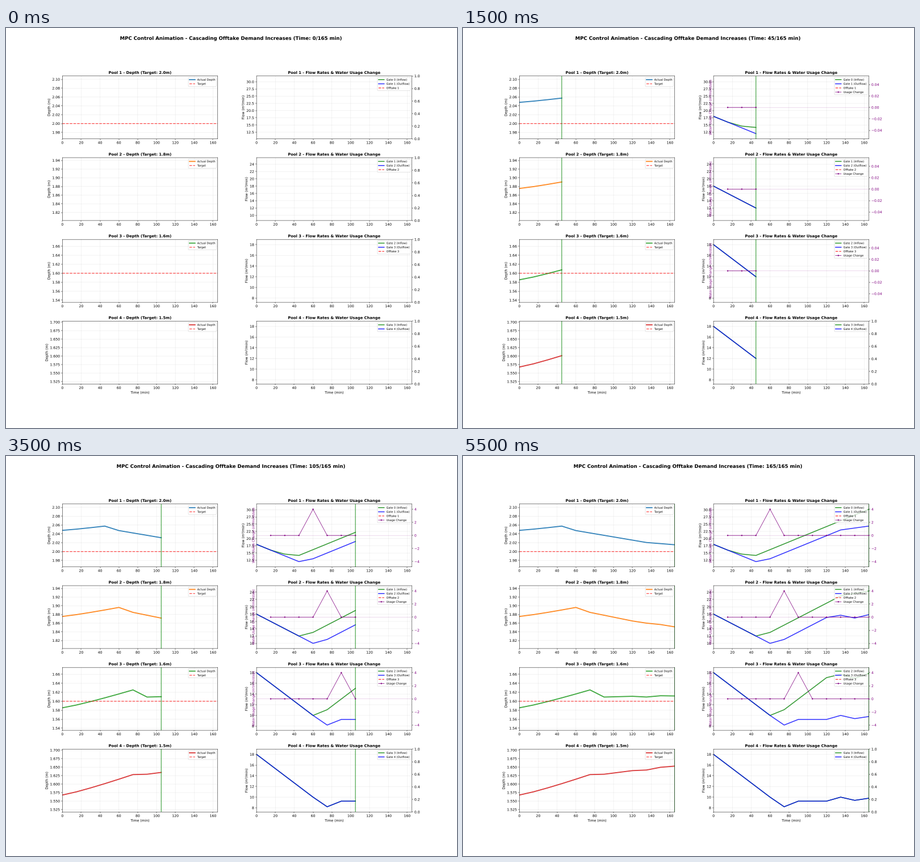
A matplotlib script that plays this animation: 794 by 706 pixels, repeating every 6 s.

```python
import numpy as np
import matplotlib.pyplot as plt
from matplotlib.animation import FuncAnimation
from matplotlib.patheffects import Normal

# The stage is small for its layout, so place lines and glyphs at sub-pixel
# positions; the neutral path effect makes text draw as outlines.
plt.rcParams.update({
    "font.family": "DejaVu Sans",
    "path.snap": False,
    "path.effects": [Normal()],
    "text.hinting": "none",
})

STEPS = np.arange(12)
TIMES = 15 * STEPS
END = TIMES[-1]


def gate_flow(turns):
    """Flow that changes at a steady rate between its turning points."""
    return np.interp(STEPS, list(turns), list(turns.values()))


GATES = [gate_flow(turns) for turns in (
    {0: 18, 1: 16, 2: 14.6, 3: 14.15, 11: 30.2},
    {0: 18, 3: 12, 4: 13, 9: 23, 11: 24.35},
    {0: 18, 4: 10, 5: 11.07, 8: 17.07, 9: 17.7, 10: 16.93, 11: 17.86},
    {0: 18, 4: 10, 5: 8.2, 6: 9.25, 8: 9.25, 9: 10, 10: 9.4, 11: 9.8},
)]
GATES.append(GATES[3])


def pool_depth(outflow, peak_step, start, peak, after, drift, gain):
    """Fill up to a peak, drop, then drift while the outflow draws depth down."""
    filling = start + (peak - start) * (STEPS / peak_step) ** 1.15
    base = peak_step + 1
    drained = (after + drift * (STEPS - base)
               - gain * (outflow - outflow[base]))
    return np.where(STEPS <= peak_step, filling, drained)


POOLS = [
    (2.0, "tab:blue", (3, 2.0480, 2.0576, 2.0475, -0.0011, 0.00215)),
    (1.8, "tab:orange", (4, 1.8754, 1.8962, 1.8848, -0.0042, 0.0012)),
    (1.6, "tab:green", (5, 1.5854, 1.6252, 1.6093, 0.00085, 0.0033)),
    (1.5, "tab:red", (5, 1.5678, 1.6281, 1.6291, 0.0053, 0.0047)),
]

fig, axes = plt.subplots(4, 2, figsize=(17.9943343, 16), dpi=44.125)
fig.subplots_adjust(left=0.125, right=0.9, bottom=0.11, top=0.88,
                    wspace=0.25, hspace=0.3)
heading = fig.suptitle("", fontsize=14, fontweight="bold", y=0.98)

curves = []   # (line, values)
cursors = []
twins = []    # (flow axes, twin axes, zero line, usage line, usage, handles)


def add_curve(ax, values, color, label, **style):
    line, = ax.plot([], [], color=color, label=label, **style)
    curves.append((line, values))
    return line


def dress(ax, title, ylabel, values, pad):
    ax.set_title(title, fontsize=11, fontweight="bold")
    ax.set_ylabel(ylabel)
    ax.set_xlim(0, END)
    ax.set_ylim(np.min(values) - pad, np.max(values) + pad)
    ax.grid(True, alpha=0.3)
    cursors.append(ax.axvline(0, color="green", alpha=0.7, linewidth=2))


def add_key(ax, handles=None):
    handles = handles or ax.get_legend_handles_labels()[0]
    ax.legend(handles=handles, loc="upper right", fontsize=8)


for pool, (depth_ax, flow_ax) in enumerate(axes):
    name = f"Pool {pool + 1}"
    target, color, behaviour = POOLS[pool]
    inflow, outflow = GATES[pool], GATES[pool + 1]

    depth = pool_depth(outflow, *behaviour)
    add_curve(depth_ax, depth, color, "Actual Depth", linewidth=3, alpha=0.9)
    depth_ax.axhline(target, color="red", linestyle="--", linewidth=2,
                     alpha=0.7, label="Target")
    dress(depth_ax, f"{name} - Depth (Target: {target}m)", "Depth (m)",
          depth, 0.05)
    add_key(depth_ax)

    handles = [
        add_curve(flow_ax, flow, gate_color, label, linewidth=2.5, alpha=0.8)
        for flow, gate_color, label in (
            (inflow, "green", f"Gate {pool} (Inflow)"),
            (outflow, "blue", f"Gate {pool + 1} (Outflow)"))
    ]
    flows = np.array([inflow, outflow])
    dress(flow_ax, f"{name} - Flow Rates & Water Usage Change",
          "Flow (m³/min)", flows, 0.1 * np.ptp(flows))

    twin = flow_ax.twinx()
    twin.spines[:].set_visible(False)
    if pool < 3:
        # Offtake flows lie below the visible range, so only the key shows them.
        handles += flow_ax.plot([], [], "r--", linewidth=2, alpha=0.8,
                                label=f"Offtake {pool + 1}")
        zero = twin.axhline(0, color="purple", linewidth=0.8, alpha=0.3)
        usage, = twin.plot([], [], "o-", color="purple", linewidth=1.5,
                           markersize=3, alpha=0.8, label="Usage Change")
        twin.yaxis.set_label_position("left")
        # Each pool's demand jumps one step later than the one upstream.
        change = 4.0 * (STEPS == pool + 4)
        twins.append((flow_ax, twin, zero, usage, change, handles))
    else:
        add_key(flow_ax, handles)

for ax in axes[-1]:
    ax.set_xlabel("Time (min)")


def update_twin(step, ax, twin, zero, usage, change, handles):
    started = step > 0
    seen = change[1:step + 1]
    usage.set_data(TIMES[1:step + 1], seen)
    zero.set_visible(started)
    if started:
        limit = 1.2 * seen.max() or 0.055
        twin.set_ylim(-limit, limit)
        twin.set_ylabel("Water Usage Change (m³/min/step)",
                        color="purple", fontsize=9)
    else:
        twin.set_ylim(0, 1)
        twin.set_ylabel("")
    twin.tick_params(axis="y", labelcolor="purple" if started else "black")
    add_key(ax, handles + [usage] * started)


def update(step):
    now = TIMES[step]
    heading.set_text("MPC Control Animation - Cascading Offtake Demand "
                     f"Increases (Time: {now}/{END} min)")
    shown = step + 1 if step else 0
    for line, values in curves:
        line.set_data(TIMES[:shown], values[:shown])
    for cursor in cursors:
        cursor.set_xdata([now, now])
        cursor.set_visible(step > 0)
    for parts in twins:
        update_twin(step, *parts)
    return []


anim = FuncAnimation(fig, update, frames=len(STEPS), interval=500,
                     init_func=lambda: update(0), repeat=True)
plt.show()
```
